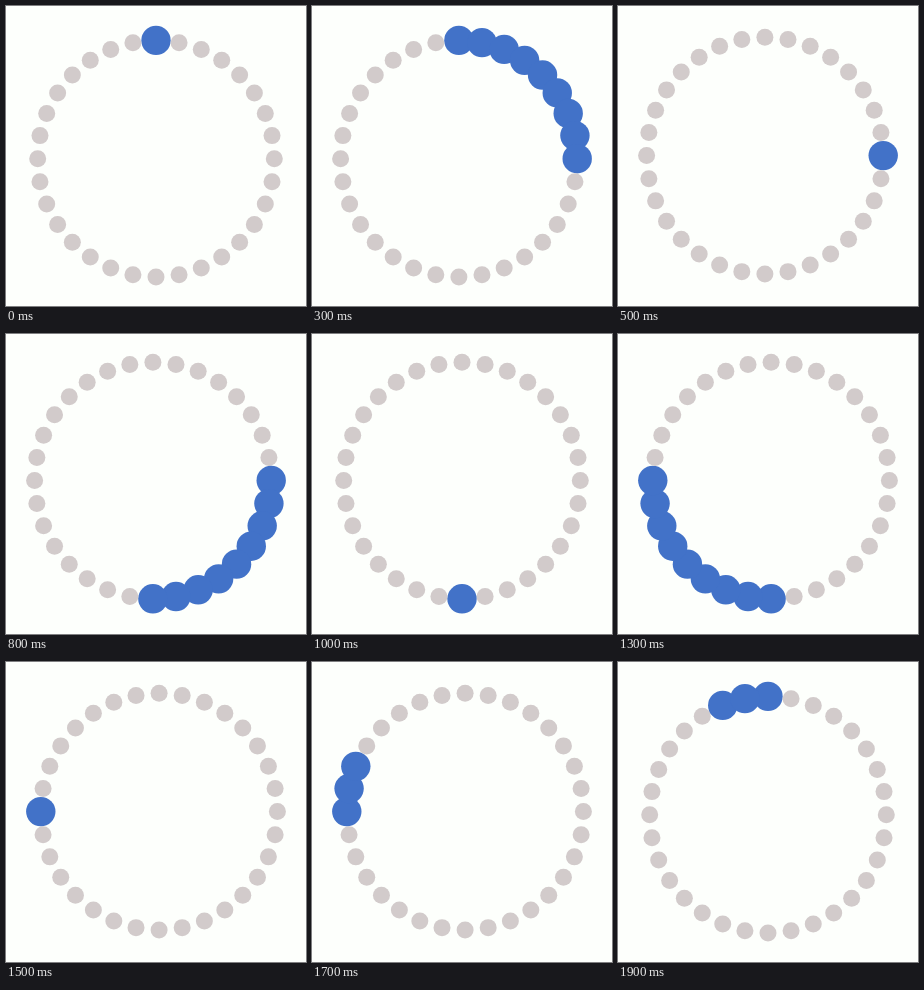
An HTML page with a canvas for the animation above (2000 ms loop, 300 px wide and 300 px high).

```html
<!DOCTYPE html>
<html>
<head>
<meta charset="utf-8">
<style>
  html, body { margin: 0; width: 100%; height: 100%; overflow: hidden; background: #fdfffc; }
  canvas { display: block; }
</style>
</head>
<body>
<canvas id="stage" width="300" height="300"></canvas>
<script>
const ctx = document.getElementById('stage').getContext('2d');

const STEP = 100, LOOP = 2000, STEPS_PER_QUARTER = 5;
const COUNT = 32, QUARTER = COUNT / 4;
const RADIUS = 118.3, SMALL = 8.5, BIG = 14.7;

// Clockwise from the top, relative to the ring's centre.
const dots = Array.from({ length: COUNT }, (_, i) => {
  const angle = 2 * Math.PI * i / COUNT;
  return { x: RADIUS * Math.sin(angle), y: -RADIUS * Math.cos(angle) };
});

// Exponential ease-in for the head, then ease-out for the tail.
const headAt = phase => Math.round(QUARTER * Math.min(1, 4 ** (phase - 3)));
const tailAt = phase => Math.round(QUARTER * Math.max(0, 1 - 4 ** (3 - phase)));

function middle(axis, radii) {
  const low = Math.min(...dots.map((dot, i) => dot[axis] - radii[i]));
  const high = Math.max(...dots.map((dot, i) => dot[axis] + radii[i]));
  return (low + high) / 2;
}

function draw(time) {
  const step = Math.floor(time % LOOP / STEP);
  const phase = step % STEPS_PER_QUARTER;
  const corner = Math.floor(step / STEPS_PER_QUARTER) * QUARTER;
  const tail = corner + tailAt(phase);
  const length = corner + headAt(phase) - tail;
  const active = dots.map((_, i) => (i - tail + COUNT) % COUNT <= length);
  const radii = active.map(on => on ? BIG : SMALL);

  // The ring's bounding box stays centred, so big dots push it aside.
  const cx = 150 - middle('x', radii);
  const cy = 149.6 - middle('y', radii);

  ctx.fillStyle = '#fdfffc';
  ctx.fillRect(0, 0, 300, 300);
  dots.forEach(({ x, y }, i) => {
    ctx.fillStyle = active[i] ? '#4272c8' : '#d2cbcb';
    ctx.beginPath();
    ctx.arc(cx + x, cy + y, radii[i], 0, 2 * Math.PI);
    ctx.fill();
  });
}

const began = performance.now();
function tick() {
  draw(performance.now() - began);
  requestAnimationFrame(tick);
}
tick();
</script>
</body>
</html>
```
